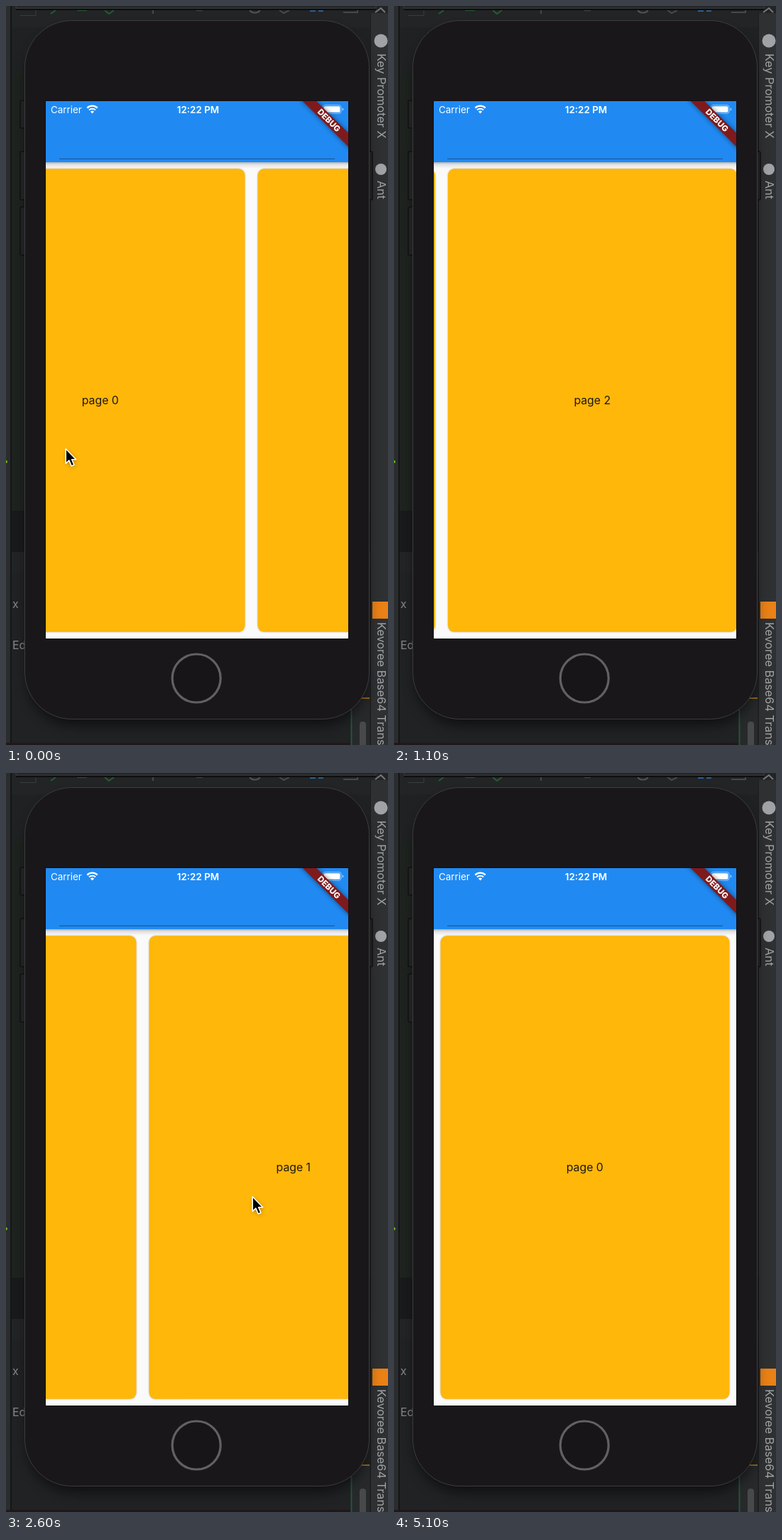
An HTML page for the animation above (5.2 s loop, 538 px wide and 1041 px high).

```html
<!DOCTYPE html>
<html lang="en">
<head>
<meta charset="utf-8">
<title>Page view in a phone simulator</title>
<style>
  html, body { margin: 0; width: 100%; height: 100%; overflow: hidden; background: #1c1d1f; }
  svg { display: block; font-family: Inter, "Liberation Sans", sans-serif; }
  #pages rect { filter: drop-shadow(0 .8px .8px rgba(0, 0, 0, .25)); }
</style>
</head>
<body>
<svg width="538" height="1041" viewBox="0 0 538 1041">
  <defs>
    <clipPath id="screen"><rect x="56" y="134" width="426" height="757"/></clipPath>
    <filter id="soft" x="-30%" y="-30%" width="160%" height="160%"><feGaussianBlur stdDeviation="9"/></filter>
    <filter id="blur" x="-40%" y="-100%" width="180%" height="300%"><feGaussianBlur stdDeviation="3.6"/></filter>
    <linearGradient id="barShade" x2="0" y2="1">
      <stop stop-color="#000" stop-opacity=".3"/>
      <stop offset=".35" stop-color="#000" stop-opacity=".1"/>
      <stop offset="1" stop-color="#000" stop-opacity="0"/>
    </linearGradient>
  </defs>

  <!-- editor window behind the phone -->
  <rect width="538" height="1041" fill="#222426"/>
  <rect x="8" y="30" width="506" height="65" fill="#202123"/>
  <rect x="8" y="95" width="506" height="616" fill="#1e231f"/>
  <rect x="8" y="711" width="506" height="58" fill="#191a1c"/>
  <rect x="8" y="798" width="506" height="243" fill="#202224"/>
  <rect y="0" width="6" height="1041" fill="#2a2c2e"/>
  <path d="M7 0V1041" stroke="#141516" stroke-width="2"/>
  <circle cx="0" cy="642" r="2" fill="#67c31f"/>
  <rect x="513" y="10" width="25" height="1031" fill="#2e3032"/>
  <path d="M513.5 10V1041" stroke="#1c1d1f"/>
  <rect y="1038" width="486" height="3" fill="#211719"/>

  <!-- toolbar scraps -->
  <g fill="none" stroke-width="2">
    <path d="M20 13.5H42V4" stroke="#3a3c3e" stroke-width="1"/>
    <path d="M63 11l7-5M100 6h14M139 6l6 5 7-5" stroke="#245c33"/>
    <path d="M207 5v6M268 6h9M384 5l7 5 8-4M475 9h20V5" stroke="#46484a"/>
    <path d="M343 5a8 7 0 0 0 15 0" stroke="#515355"/>
    <path d="M428 7h8M440 7h7" stroke="#2c5f90"/>
    <path d="M520 9l8-6 6 6" stroke="#777"/>
  </g>
  <path d="M14 0V3H521V0" fill="#242527" stroke="#3c3d3f"/>
  <path d="M14 5H521" stroke="#0e0e0f" stroke-width="2"/>

  <g fill="#85878a" font-size="16">
    <text x="9" y="848">x</text>
    <text x="9" y="906">Edit</text>
  </g>
  <path d="M486.5 985V1041" stroke="#28553a" stroke-width="2"/>
  <rect x="488" y="975" width="24" height="66" fill="#27292b"/>
  <path d="M499 975H512" stroke="#9a6b1c" stroke-width="2"/>
  <rect x="498" y="1008" width="9" height="40" rx="4" fill="#47494b"/>

  <g id="tabs" fill="#a0a2a5" font-size="16.3">
    <circle cx="528" cy="49" r="9.5"/>
    <circle cx="528" cy="230" r="8"/>
    <rect x="516" y="839" width="22" height="24" fill="#e98116"/>
    <text transform="translate(523 67) rotate(90)">Key Promoter X</text>
    <text transform="translate(523 246) rotate(90)">Ant</text>
    <text transform="translate(523 868) rotate(90)">Kevoree Base64 Transcoder</text>
  </g>

  <!-- phone -->
  <rect x="30" y="35" width="479" height="978" rx="65" fill="#000" opacity=".55" filter="url(#soft)"/>
  <g fill="#202123" stroke="#101011" stroke-width="1.5">
    <rect x="20" y="133" width="10" height="39" rx="2"/>
    <rect x="20" y="205" width="10" height="68" rx="2"/>
    <rect x="20" y="283" width="10" height="68" rx="2"/>
    <rect x="506" y="205" width="10" height="68" rx="2"/>
  </g>
  <rect x="26.5" y="20.5" width="485" height="984" rx="66" fill="#1a171a" stroke="#3d3c3e"/>
  <circle cx="268.2" cy="947" r="34" fill="#181518" stroke="#626063" stroke-width="3.2"/>
  <rect x="55" y="133" width="428" height="759" fill="#121013"/>

  <g clip-path="url(#screen)">
    <rect x="56" y="134" width="426" height="757" fill="#fafafa"/>
    <g id="pages" font-size="15.8" text-anchor="middle"></g>
    <rect x="56" y="220" width="426" height="9" fill="url(#barShade)"/>
    <rect x="56" y="134" width="426" height="86" fill="#208af2"/>
    <path d="M75 215.3H463" stroke="#1a5d9f" stroke-width="1.3"/>
    <g fill="#fff" font-size="13.4">
      <text x="63" y="150.5">Carrier</text>
      <text x="270.5" y="150.5" text-anchor="middle" font-weight="600">12:22 PM</text>
      <g fill="none" stroke="#fff" stroke-width="2.2">
        <path d="M114.3 143.6a10.4 10.4 0 0 1 14.4 0M117 146.5a6.6 6.6 0 0 1 9 0"/>
      </g>
      <path d="M121.5 151.5l-2.6-2.8a3.7 3.7 0 0 1 5.2 0Z"/>
      <rect x="446" y="139.7" width="26" height="11.6" rx="3" fill="none" stroke="#fff" stroke-opacity=".5"/>
      <rect x="447.5" y="141.2" width="23" height="8.6" rx="1.6"/>
      <path d="M473.5 143.5a2 2 0 0 1 0 4Z" opacity=".5"/>
    </g>
    <g transform="translate(482 134) rotate(45)">
      <rect x="-50" y="31.7" width="100" height="13.6" opacity=".5" filter="url(#blur)"/>
      <rect x="-50" y="31.7" width="100" height="13.6" fill="#7f1a1c"/>
      <text y="42.3" font-size="11.5" font-weight="800" fill="#fff" text-anchor="middle">DEBUG</text>
    </g>
  </g>

  <g id="cursor">
    <g transform="translate(1.2 1.8) scale(.93)">
      <path d="M1 2V24L6 19.5L9.5 28L13.5 26.3L10 18H16.5Z" opacity=".35" filter="url(#blur)"/>
      <path d="M0 0V22.2L5 17.6L8.6 26L12.6 24.3L9.1 16.1H15.6Z" stroke="#fff" stroke-width="1.7" stroke-linejoin="round"/>
    </g>
  </g>
</svg>

<script>
const LOOP = 5200, STEP = 100, PAGE = 425;

// [start, from, to, drag length]; without a length the scroll settles like a spring
const scrolls = [
  [0, 136, 425],
  [500, 421, 560, 233],
  [733, 560, 852.5],
  [1430, 852, 736, 308],
  [1738, 736, 425],
  [2300, 427, 289, 300],
  [2600, 289, 0]
];

// pointer path: [time, x, y]
const path = [
  [0, 83, 622], [200, 83, 622], [500, 130, 612], [740, -25, 600], [1100, -25, 590],
  [1350, 156, 563], [1430, 156, 563], [1738, 270, 571], [2000, 270, 571],
  [2300, 210, 588], [2600, 346, 595], [3100, 346, 595], [3650, 470, 1060]
];

const pages = document.getElementById('pages');
const cursor = document.getElementById('cursor');
const mix = (a, b, k) => a + (b - a) * k;

for (let i = 0; i < 3; i++) {
  pages.innerHTML += `<g transform="translate(${i * PAGE})">
    <rect x="65.5" y="229.3" width="407" height="652.5" rx="9" fill="#ffb70a"/>
    <text x="268.8" y="561" fill="#1d1a14">page ${i}</text></g>`;
}

function scrollAt(t) {
  const [start, from, to, length] = scrolls.findLast(s => s[0] <= t);
  const age = t - start;
  return length ? mix(from, to, age / length) : mix(to, from, Math.exp(-age * 0.0085));
}

function pointerAt(t) {
  const i = path.findIndex(p => p[0] > t);
  if (i < 0) return path.at(-1).slice(1);
  const [t0, x0, y0] = path[i - 1], [t1, x1, y1] = path[i];
  const u = (t - t0) / (t1 - t0), k = u * u * (3 - 2 * u);
  return [mix(x0, x1, k), mix(y0, y1, k)];
}

function draw(now) {
  const t = Math.floor((now % LOOP) / STEP) * STEP;
  pages.setAttribute('transform', `translate(${-scrollAt(t)})`);
  cursor.setAttribute('transform', `translate(${pointerAt(t)})`);
}

let origin;
function tick(now) {
  origin ??= now;
  draw(now - origin);
  requestAnimationFrame(tick);
}
draw(0);
requestAnimationFrame(tick);
</script>
</body>
</html>
```
